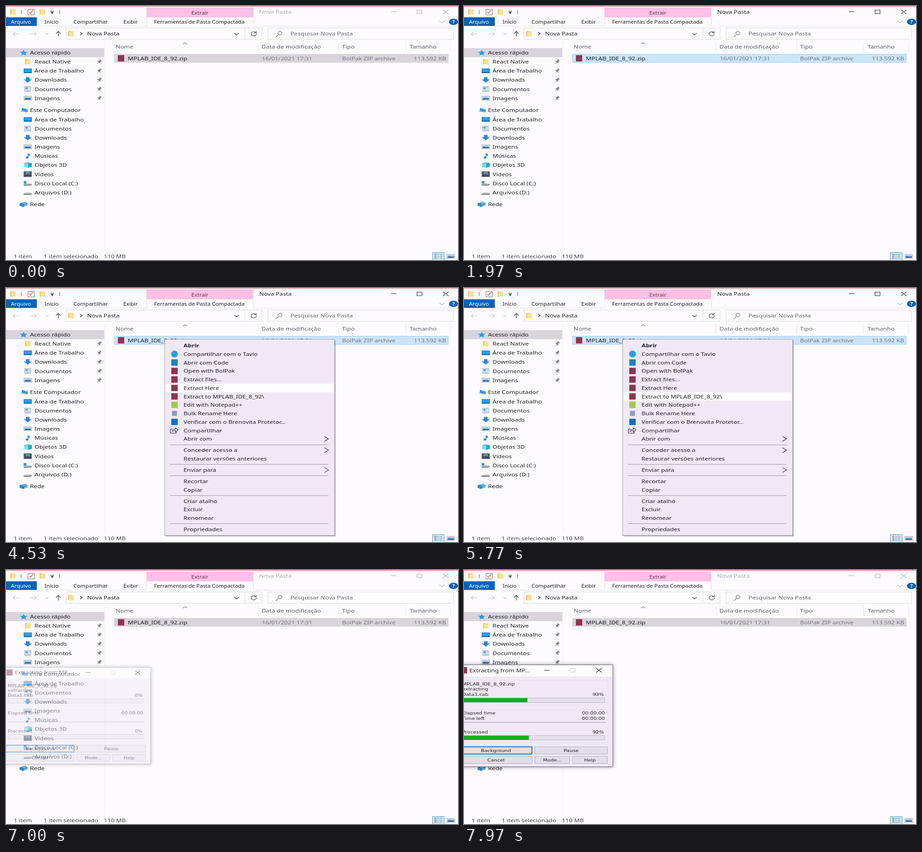
An HTML page for the animation above (8000 ms loop, 998 by 561 pixels).

```html
<!DOCTYPE html>
<html lang="pt">
<head>
<meta charset="utf-8">
<title>Nova Pasta</title>
<style>
html, body { margin: 0; width: 100%; height: 100%; overflow: hidden; background: #fdfbff; }
svg { display: block; width: 100vw; height: 100vh; }
text { font-family: "Noto Sans", "Open Sans", sans-serif; white-space: pre; }
.ui text { font-family: "DejaVu Sans", sans-serif; }
</style>
</head>
<body>
<svg id="stage" viewBox="0 0 998 561" preserveAspectRatio="none"></svg>
<script>
const LOOP = 8000;
const ASPECT = 1.2; // the whole screen is shown wider than tall
const INK = '#211f27', GREY = '#77747f', PALE = '#c9c5d0', BLUE = '#0a62b5';
const PANEL = '#f0e9f5', SELECTED = '#d9d4db';

// ---------- drawing helpers ----------
const attrs = o => Object.entries(o).map(([k, v]) => ` ${k}="${v}"`).join('');
const rect = (x, y, w, h, fill, more = {}) =>
  `<rect${attrs({ x, y, width: w, height: h, fill, ...more })}/>`;
const box = (x, y, w, h, fill, stroke, more = {}) =>
  rect(x + .5, y + .5, w - 1, h - 1, fill, { stroke, ...more });
const path = (d, stroke, width = 1, more = {}) =>
  `<path${attrs({ d, stroke, 'stroke-width': width, fill: 'none', ...more })}/>`;
const shape = (d, fill) => `<path d="${d}" fill="${fill}"/>`;
const disc = (x, y, r, fill) => `<circle cx="${x}" cy="${y}" r="${r}" fill="${fill}"/>`;
const group = (id, content, more = {}) => `<g${attrs({ id, ...more })}>${content}</g>`;
const at = (x, y, content) => `<g transform="translate(${x} ${y})">${content}</g>`;
// y is the middle of the capital letters
function label(x, y, str, { size = 11.4, fill = INK, anchor = 'start', ...more } = {}) {
  const place = `translate(${x} ${y + size * .36}) scale(${ASPECT} 1)`;
  return `<text${attrs({ transform: place, 'font-size': size, fill, 'text-anchor': anchor, ...more })}>${str}</text>`;
}

// ---------- icons, each around 0,0 ----------
const mark = (fill, s = 14) => rect(-s / 2, -s / 2, s, s, fill);
const icon = {
  folder: shape('M-6-6h5l1 1h6v11h-12z', '#f3cf6a') + shape('M-3-4h8v10h-8z', '#fbe199'),
  star: shape('M0-6 2.2-2 8-1.5 4 1.5 5 6 0 4-5 6-4 1.5-8-1.5-2.2-2z', '#2f9be0'),
  desktop: rect(-9, -5, 18, 10, '#0d6fbd') + rect(-8, -4, 16, 7, '#27a0ee') + rect(-8, 3, 16, 1, '#0b4f91'),
  down: shape('M-4-6h8v5h5l-9 7-9-7h5z', '#2f86d2'),
  doc: box(-7, -6, 14, 12, '#fff', '#8b96a1') + rect(-5, -4, 5, 4, '#4b9bd5') +
    path('M1-3.5h4M1-1.5h4M-5 1.5h10M-5 3.5h10', '#6ba7d1'),
  picture: box(-9, -5, 18, 10, '#f4f6f8', '#9ba7b2') + rect(-7, -3, 14, 6, '#8ec6ee') +
    shape('M-7 3v-2l5-1 4 1 5-1v3z', '#2b5573'),
  pc: shape('M-4-5 9-2v6l-13-2z', '#2c94dc') + shape('M-4-5 9-2v3z', '#69bdf0') +
    shape('M-9 2l5-1 13 3-3 1.500z', '#aab3bd'),
  music: shape('M0-6 5-3v3l-3.500-1.500v5a3 2.400 0 1 1-1.500-2z', '#1183dd'),
  cube: shape('M-8-4 1-6 9-4v8l-8 2-9-2z', '#19a9cb') + shape('M-8-4 1-3v9l-9-2z', '#7fdcec') +
    shape('M-8-4 1-6 9-4 1-3z', '#4fc5de'),
  film: rect(-9, -6, 18, 12, '#34343e') + rect(-5, -5, 10, 10, '#6b8fb4') + shape('M-5 5v-4l6-2 4 3v3z', '#3b4f63') +
    path('M-7.500-5v10M7.500-5v10', '#d6d6de', 1.5, { 'stroke-dasharray': 1.5 }),
  disk: shape('M-9 2l5-2h11l2 2v1h-18z', '#c9c7cf') + shape('M-9 3h15l3-1v1.500l-3 1.500h-15z', '#65636d'),
  net: shape('M-9-2 0-5 6-3v6l-8 3-7-3z', '#3d8fc9') + shape('M-3-4 4-6 9-2 8 3 1 4z', '#65b7e6') +
    path('M-9-2-1 1v4M-1 1 8-2', '#1f659c'),
  pin: `<g transform="rotate(42)">${shape('M-3-5h6v1h-1v3l2 2v1h-8v-1l2-2v-3h-1z', '#85818d')}${path('M0 2v4', '#85818d')}</g>`,
  archive: mark('#8d3550')
};
icon.drive = icon.disk + at(-6, -2, mark('#27a0e4', 6));

// ---------- explorer window ----------
function ribbon() {
  const tab = (x, str) => label(x, 35, str, { size: 10.15 });
  return rect(0, 0, 998, 1, '#d0665f') +
    at(15, 13, icon.folder) + at(80, 13, icon.folder) +
    path('M33.500 9v9M118.500 9v9', '#5d5965') +
    box(48, 7, 15, 13, '#fff', '#6f6a76') + path('M51 13l3 3 6-7', '#d4633d', 1.6) +
    path('M98 11.500h8', INK) + shape('M98.500 13.500h7l-3.500 4z', INK) +
    rect(310, 3, 236, 22, '#fec0e6') +
    label(428, 15, 'Extrair', { size: 10.15, anchor: 'middle', fill: '#5c3350' }) +
    path('M68 44.500H310.500V25M546.500 25V44.500H998', '#e4dfe9') +
    rect(0, 25, 68, 19, BLUE) +
    label(33, 35, 'Arquivo', { size: 10.15, anchor: 'middle', fill: '#fff' }) +
    tab(85, 'Início') + tab(149, 'Compartilhar') + tab(259, 'Exibir') +
    tab(327, 'Ferramentas de Pasta Compactada') +
    path('M957 33l5.500 4 5.500-4', '#918d99') + `<ellipse cx="988" cy="35" rx="10" ry="7" fill="${BLUE}"/>` +
    label(988, 35, '?', { size: 10, anchor: 'middle', fill: '#fff', 'font-weight': 700 });
}

function addressBar() {
  return path('M30 61.500H16M21 57.500l-5 4 5 4M53 61.500h14M62 57.500l5 4-5 4M87 60l3.500 3 3.500-3', PALE, 1.2) +
    path('M115.500 67V56M110.500 61l5-5 5 5', '#55515d', 1.5) +
    box(132, 48, 396, 26, 'none', '#dcd8e1') + box(527, 48, 39, 26, 'none', '#dcd8e1') +
    box(578, 48, 411, 26, 'none', '#dcd8e1') +
    at(143, 61, icon.folder) + path('M164 58l4 3-4 3', INK, 1.2) + label(179, 61, 'Nova Pasta') +
    path('M504 60l5 4 5-4', '#55515d', 1.4) +
    path('M551 58a6 4.500 0 1 0 2 3M552.500 55.500v3.500h-4.500', '#55515d', 1.3) +
    path('M602 63a4.500 3.800 0 1 1 1 .5M602 63l-6 5', '#6d6975', 1.1) +
    label(628, 61, 'Pesquisar Nova Pasta', { fill: '#67636f' });
}

function sidebar() {
  const roots = [[103, 'star', 'Acesso rápido'], [230, 'pc', 'Este Computador'], [438, 'net', 'Rede']];
  const pinned = [['folder', 'React Native'], ['desktop', 'Área de Trabalho'], ['down', 'Downloads'],
    ['doc', 'Documentos'], ['picture', 'Imagens']];
  const places = [['desktop', 'Área de Trabalho'], ['doc', 'Documentos'], ['down', 'Downloads'],
    ['picture', 'Imagens'], ['music', 'Músicas'], ['cube', 'Objetos 3D'], ['film', 'Vídeos'],
    ['drive', 'Disco Local (C:)'], ['disk', 'Arquivos (D:)']];
  const child = (y, [name, str]) => at(48, y, icon[name]) + label(63, y, str);
  return rect(0, 93, 217, 20, SELECTED) + path('M218.500 79V541', '#f1edf5') +
    roots.map(([y, name, str]) => at(39, y, icon[name]) + label(53, y, str)).join('') +
    pinned.map((p, i) => child(123 + i * 20.15, p) + at(206, 123 + i * 20.15, icon.pin)).join('') +
    places.map((p, i) => child(250.5 + i * 20.15, p)).join('');
}

function fileList() {
  const head = { fill: '#5f5b6b' }, cell = { fill: GREY };
  return path('M556.500 79v22M734.500 79v22M882.500 79v22M981.500 79v22', '#e6e2eb') +
    path('M391 84l4.500-3 4.500 3', '#77737f', 1.1) +
    label(242, 90, 'Nome', head) + label(564, 90, 'Data de modificação', head) +
    label(742, 90, 'Tipo', head) + label(891, 90, 'Tamanho', head) +
    box(239, 106, 738, 19, SELECTED, SELECTED, { id: 'row' }) +
    at(254, 115.5, icon.archive) + label(269, 115.5, 'MPLAB_IDE_8_92.zip') +
    label(565, 115.5, '16/01/2021 17:31', cell) + label(742, 115.5, 'BolPak ZIP archive', cell) +
    label(972, 115.5, '113.592 KB', { ...cell, anchor: 'end' });
}

function statusBar() {
  const soft = { fill: '#45414f' };
  return label(17, 553, '1 item', soft) + label(83, 553, '1 item selecionado', soft) + label(216, 553, '110 MB', soft) +
    box(941, 544, 27, 18, '#c9e8f5', '#4fa5c4') +
    path('M946 548.500h4M946 552.500h4M946 556.500h4', '#b0605c', 2) +
    path('M952 548.500h4M958 548.500h5M952 552.500h4M958 552.500h5M952 556.500h4M958 556.500h5', '#6f7e8a') +
    at(982, 553, icon.picture);
}

const caption = group('caption', label(559, 13, 'Nova Pasta', { fill: 'currentColor' }) +
  path('M850 12.500h12M907.500 9h11v8h-11zM965 8.500l12 9M977 8.500l-12 9', 'currentColor', 1.1));

// ---------- context menu ----------
const PITCH = 18.75, GAP = 6.2;
const menuRows = [
  { str: 'Abrir', bold: true }, { str: 'Compartilhar com o Tavlo', art: disc(0, 0, 7.5, '#23a3e0') },
  { str: 'Abrir com Code', art: mark('#1f7fc0') }, { str: 'Open with BolPak', art: icon.archive },
  { str: 'Extract files...', art: icon.archive }, { str: 'Extract Here', art: icon.archive },
  { str: 'Extract to MPLAB_IDE_8_92\\', art: icon.archive },
  { str: 'Edit with Notepad++', art: mark('#a5c653') }, { str: 'Bulk Rename Here', art: mark('#8b9bb8', 11) },
  { str: 'Verificar com o Brenovita Protetor...', art: mark('#0f70c6') },
  { str: 'Compartilhar', art: path('M-4-3h-5v9h13v-3M-5 2c1-4 4-4.500 7-4.500v-3l6 4.500-6 4.500v-3c-3 0-5 0-7 1.500z', INK, 1.1) },
  { str: 'Abrir com', more: true }, null,
  { str: 'Conceder acesso a', more: true }, { str: 'Restaurar versões anteriores' }, null,
  { str: 'Enviar para', more: true }, null, { str: 'Recortar' }, { str: 'Copiar' }, null,
  { str: 'Criar atalho' }, { str: 'Excluir' }, { str: 'Renomear' }, null, { str: 'Propriedades' }
];

function menuItem({ str, bold, art, more }, y) {
  return (art ? at(372, y, art) : '') +
    label(392, y, str, { size: 11.35, ...(bold && { 'font-weight': 700 }) }) +
    (more ? path(`M703 ${y - 5.5}l9 5.500-9 5.500`, INK, 1.1) : '');
}

function menu() {
  let y = 127, out = '';
  for (const row of menuRows) {
    if (row) {
      out += menuItem(row, y);
      y += PITCH;
    } else {
      out += path(`M362 ${Math.round(y - 6.4) + .5}H712`, '#97939e');
      y += GAP;
    }
  }
  return rect(353, 116, 375, 433, '#5a5666', { opacity: .25 }) + rect(352, 115, 375, 433, '#5a5666', { opacity: .4 }) +
    box(350, 113, 376, 434, PANEL, '#a39fab') +
    rect(352, 0, 371, PITCH, '#fdfcff', { id: 'hover' }) + out;
}

// ---------- extraction dialog ----------
function dialog() {
  const small = { size: 9.4 };
  const right = { size: 9.4, anchor: 'end' };
  const button = (x, y, w, str) => box(x, y, w, 17, '#e3dde8', '#b2adb9') +
    label(x + w / 2, y + 8.5, str, { size: 9.3, anchor: 'middle' });
  const bar = (y, id) => box(-4, y, 315, 11, '#e5dfea', '#bbb6c2') + rect(-3, y + 1, 0, 9, '#09b020', { id });
  return rect(-12, 209, 341, 226, '#000', { filter: 'url(#blur)', opacity: .4 }) +
    box(-18, 209, 347, 226, PANEL, '#66626d') + rect(-17, 210, 345, 25, '#fefcff') +
    at(0, 221.5, icon.archive) + label(12, 221.5, 'Extracting from MP...') +
    path('M177 221.500h12M292 217l12 9M304 217l-12 9', INK, 1.1) + path('M234.500 217.500h11v8h-11z', PALE) +
    box(-10, 243, 328, 56, 'none', '#e7e1e6') + box(-10, 308, 328, 74, 'none', '#e7e1e6') +
    group('dialogText',
      label(-4, 252, 'MPLAB_IDE_8_92.zip', small) + label(-4, 263, 'extracting', small) +
      label(-4, 274.5, 'Data1.cab', small) + label(309, 274.5, '', { ...right, id: 'filePercent' }) +
      label(-4, 316, 'Elapsed time', small) + label(311, 316, '00:00:00', right) +
      group('timeLeft', label(-4, 328, 'Time left', small) + label(311, 328, '00:00:00', right)) +
      label(-4, 357.5, 'Processed', small) + label(309, 357.5, '', { ...right, id: 'totalPercent' }) +
      button(-10, 390, 161, 'Background') + button(156, 390, 161, 'Pause') +
      button(-10, 411, 161, 'Cancel') + button(156, 411, 78, 'Mode...') + button(239, 411, 78, 'Help'),
      { class: 'ui' }) +
    rect(-9, 390.5, 159, 16, 'none', { stroke: '#1377c4', 'stroke-width': 2 }) +
    bar(282, 'fileBar') + path('M-4 336.500H314', '#99949f') + bar(365, 'totalBar');
}

const stage = document.getElementById('stage');
stage.innerHTML = '<defs><filter id="blur" x="-10%" y="-10%" width="120%" height="120%"><feGaussianBlur stdDeviation="5"/></filter></defs>' +
  rect(0, 0, 998, 561, '#fdfbff') + ribbon() + caption + addressBar() + sidebar() + fileList() + statusBar() +
  group('menu', menu()) + group('chosen', menuItem(menuRows[6], 127 + 6 * PITCH)) + group('dialog', dialog());

// ---------- motion ----------
const el = Object.fromEntries([...stage.querySelectorAll('[id]')].map(n => [n.id, n]));
const set = (id, o) => { for (const k in o) el[id].setAttribute(k, o[k]); };
const ramp = (t, from, to) => Math.min(1, Math.max(0, (t - from) / (to - from)));
const show = (id, opacity) => set(id, { opacity, display: opacity > 0 ? 'inline' : 'none' });

const hoverStarts = [2800, 2865, 2990, 3130, 3290, 3670, 4800];

function render(t) {
  const active = t >= 1030 && t < 6930;
  set('caption', { color: active ? INK : '#aba7b2' });
  set('row', active ? { fill: '#cce4fa', stroke: '#9dcaf0' } : { fill: SELECTED, stroke: SELECTED });

  show('menu', t < 6400 ? ramp(t, 2250, 2450) : 0);
  const hovered = hoverStarts.filter(s => t >= s).length - 1;
  show('hover', hovered < 0 ? 0 : 1);
  set('hover', { y: 117.7 + Math.max(0, hovered) * PITCH });
  show('chosen', t < 6400 ? 0 : .88 * (1 - ramp(t, 6400, 6720)));

  const opened = 1 - (1 - ramp(t, 6940, 7150)) ** 2;
  const zoom = .9 + .1 * opened;
  show('dialog', opened);
  set('dialog', { transform: `translate(155 321) scale(${zoom}) translate(-155 -321)` });
  const work = (t - 7200) / 770;
  const percent = (from, to) => Math.max(0, Math.round(from + (to - from) * work)) + '%';
  el.filePercent.textContent = percent(19, 93);
  el.totalPercent.textContent = percent(16, 92);
  // the bars trail behind the numbers
  const fill = ramp(t, 7200, 7970);
  set('fileBar', { width: 143 * fill });
  set('totalBar', { width: 146 * fill });
  show('timeLeft', t >= 7500 ? 1 : 0);
}

function tick() {
  render(performance.now() % LOOP);
  requestAnimationFrame(tick);
}
tick();
</script>
</body>
</html>
```
